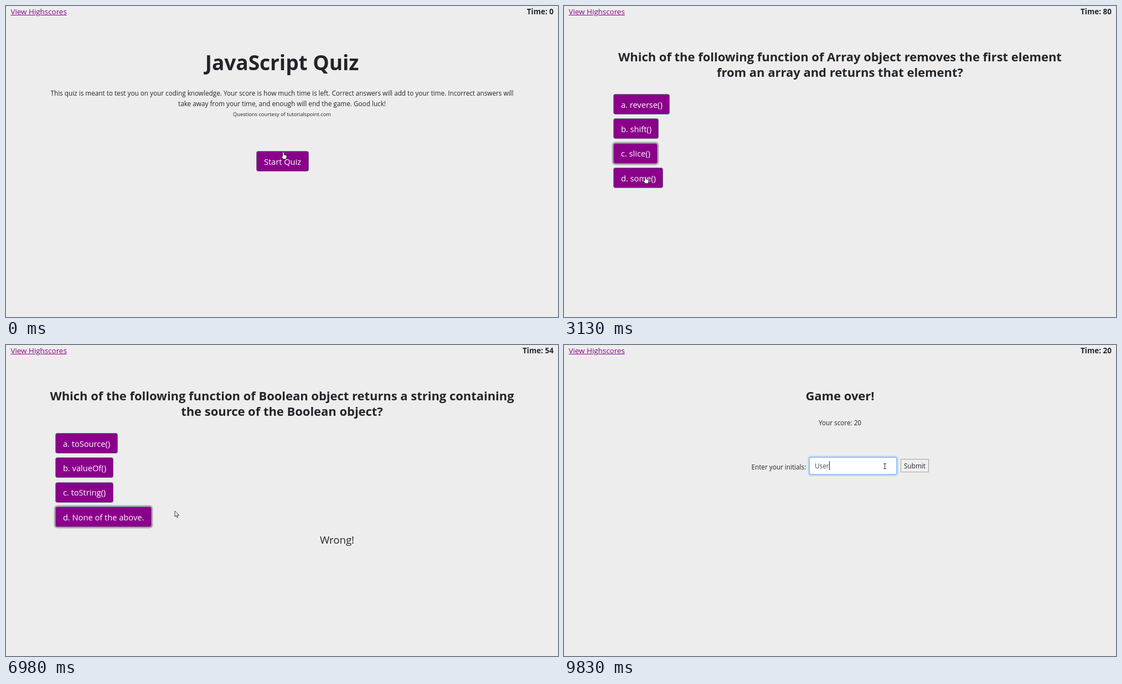
An HTML page for the animation above (9970 ms loop, 997 px wide and 562 px high).

```html
<!DOCTYPE html>
<html lang="en">
<head>
<meta charset="utf-8">
<title>JavaScript Quiz</title>
<style>
html, body { margin: 0; width: 997px; height: 562px; overflow: hidden; }
body { position: relative; background: #ededed; color: #212529; font: 11.74px "Open Sans", "Noto Sans", sans-serif; white-space: nowrap; }
body > *, .at { position: absolute; }
.row { position: absolute; left: 0; width: 997px; text-align: center; }
#link { left: 8.5px; top: 0; font-size: 13.4px; line-height: 20px; color: #8b008b; text-decoration: underline; }
#time { right: 8px; top: 0; font-size: 13.5px; line-height: 20px; font-weight: 700; }
h1, h2 { margin: 0; text-align: center; font-weight: 700; }
h1 { font-size: 37px; line-height: 48px; }
h2 { font-size: 21.95px; line-height: 28px; }
.btn { box-sizing: border-box; width: fit-content; padding: 6.5px 12.4px 5.4px 12.9px; border: 1px solid #6c757d; border-radius: 3.7px; background: #8b008b; color: #fff; font-size: 14.65px; line-height: 23.1px; text-align: center; }
.list { margin: 25.5px 0 0 89px; }
.list .btn { margin-bottom: 7.4px; }
.long { width: 534px; }
.ring { box-shadow: 0 0 0 2.4px rgba(108, 117, 125, .5); }
.msg { margin-left: 567px; font-size: 18.6px; line-height: 30px; }
.field { box-sizing: border-box; left: 443px; top: 203px; width: 158px; height: 31px; padding-left: 9px; border: 1px solid #ced4da; border-radius: 3px; background: #fff; color: #495057; line-height: 29px; }
.focus { border-color: #80bdff; box-shadow: 0 0 0 2.4px rgba(0, 123, 255, .25); }
.focus span { border-right: 1px solid #222; }
.submit { box-sizing: border-box; left: 608px; top: 206px; width: 51px; height: 24px; border: 1px solid #a0a0a0; background: #efefef; line-height: 23px; text-align: center; }
#cursor { left: 0; top: 0; overflow: visible; pointer-events: none; }
</style>
</head>
<body>
<div id="link">View Highscores</div>
<div id="time"></div>
<div id="page"></div>
<svg id="cursor" width="1" height="1"><path stroke="#222" stroke-width=".9" stroke-linejoin="round"/></svg>
<script>
const $ = id => document.getElementById(id);
const LOOP = 9970, OVER = 8870, TYPING = 9400, SECOND = 600;

const questions = {
  upper: ['Which built-in method returns the calling string value converted to upper<br>case?',
    'toUpperCase()', 'toUpper()', 'changeCase(case)', 'None of the above.'],
  array: ['Which of the following function of Array object removes the first element<br>from an array and returns that element?',
    'reverse()', 'shift()', 'slice()', 'some()'],
  string: ['Which of the following function of String object extracts a section of a string<br>and returns a new string?',
    'slice()', 'split()', 'replace()', 'search()'],
  bool: ['Which of the following function of Boolean object returns a string containing<br>the source of the Boolean object?',
    'toSource()', 'valueOf()', 'toString()', 'None of the above.'],
  cookie: ['Which of the following is true about cookie handling in JavaScript?',
    'JavaScript can manipulate cookies using the cookie property of the<br>Document object.',
    'JavaScript can read, create, modify, and delete the cookie or cookies<br>that apply to the current web page.',
    'Both of the above.', 'None of the above.']
};

// Each scene begins with a click on answer `pick`; `rest` is where the pointer goes next.
const scenes = [
  { at: 0, page: 'start', points: 0, rest: [0, 501, 264] },
  { at: 300, page: 'upper', points: 75, rest: [300, 500, 275] },
  { at: 820, page: 'upper', pick: 'a', points: 10, rest: [970, 156, 229] },
  { at: 2050, page: 'array', pick: 'b', points: -10 },
  { at: 2820, page: 'array', pick: 'c', points: 10, rest: [3130, 147, 308] },
  { at: 3730, page: 'string', pick: 'd', points: -10 },
  { at: 4360, page: 'string', pick: 'a', points: 10, rest: [4660, 148, 234] },
  { at: 5420, page: 'bool', pick: 'b', points: -10 },
  { at: 6660, page: 'bool', pick: 'd', points: -10, rest: [6980, 305, 300] },
  { at: 7750, page: 'cookie', pick: 'c', points: -10 },
  { at: 8400, page: 'cookie', pick: 'b', points: -10, rest: [8710, 245, 262.5] },
  { at: OVER, page: 'over', points: -10, rest: [OVER, 229, 276] }
];

const path = scenes.flatMap(({ at, pick, rest }) => [
  ...(pick ? [[at, 150, 178 + 44.4 * 'abcd'.indexOf(pick)]] : []),
  ...(rest ? [rest] : [])
]).concat([[TYPING, 579.5, 219], [LOOP, 579.5, 219]]);

const pointers = {
  hand: ['M-1.3 .8Q0-.9 1.3 .8V4.8L5 5.8Q6.3 6.3 6 8.5L5.2 12.7H-.3L-3.4 8.4Q-3.6 6.6-1.3 8Z', '#fff'],
  arrow: ['M0 0V10.2L2.4 8L4 11.8L5.7 11L4.1 7.4H7.2Z', '#fff'],
  beam: ['M-2.5-4.5H2.5M0-4.5V4.5M-2.5 4.5H2.5', 'none']
};

const row = (center, height, text, style = '') =>
  `<div class="row" style="top:${center - height / 2}px;line-height:${height}px;${style}">${text}</div>`;

function startPage() {
  return row(101.6, 48, '<h1>JavaScript Quiz</h1>') +
    row(157.5, 18.7, 'This quiz is meant to test you on your coding knowledge. Your score is how much time is left. Correct answers will add to your time. Incorrect answers will<br>take away from your time, and enough will end the game. Good luck!') +
    row(195.7, 14, 'Questions courtesy of tutorialspoint.com', 'font-size:9.3px') +
    '<div class="at btn" style="left:452px;top:262px">Start Quiz</div>';
}

function questionPage([title, ...answers], { pick, points }) {
  const buttons = answers.map((text, i) => {
    const key = 'abcd'[i];
    const look = (text.includes('<br>') ? ' long' : '') + (key === pick ? ' ring' : '');
    return `<div class="btn${look}">${key}. ${text}</div>`;
  }).join('');
  return `<div class="row" style="top:77.5px;text-align:left"><h2>${title}</h2>
    <div class="list">${buttons}</div>${points < 0 ? '<div class="msg">Wrong!</div>' : ''}</div>`;
}

function overPage(t) {
  const typed = 'User'.slice(0, Math.max(0, Math.floor((t - TYPING) / 100)));
  return row(91.5, 28, '<h2>Game over!</h2>') + row(139.5, 18, 'Your score: 20') +
    '<div class="at" style="left:338.5px;top:211.4px;line-height:18px">Enter your initials:</div>' +
    `<div class="at field${t >= TYPING ? ' focus' : ''}"><span>${typed}</span></div>` +
    '<div class="at submit">Submit</div>';
}

function timeLeft(past, t) {
  if (past.length === 1) return 0;
  const ticks = Math.floor((Math.min(t, OVER) + 180) / SECOND);
  return past.reduce((sum, s) => sum + s.points, 0) - ticks;
}

function pointerAt(t) {
  const i = path.findIndex(k => k[0] > t);
  const [t0, x0, y0] = path[i - 1], [t1, x1, y1] = path[i];
  const p = (t - t0) / (t1 - t0), ease = p * p * (3 - 2 * p);
  return [x0 + (x1 - x0) * ease, y0 + (y1 - y0) * ease];
}

function drawPointer(t) {
  const [x, y] = pointerAt(t);
  const under = document.elementFromPoint(x, y);
  const kind = under?.closest('.btn') ? 'hand' : under?.closest('.field') ? 'beam' : 'arrow';
  const shape = $('cursor').firstChild;
  shape.setAttribute('d', pointers[kind][0]);
  shape.setAttribute('fill', pointers[kind][1]);
  shape.setAttribute('transform', `translate(${x} ${y})`);
}

let shown;
function frame(now) {
  const t = now % LOOP;
  const past = scenes.filter(s => s.at <= t);
  const scene = past.at(-1);
  const html = scene.page === 'start' ? startPage()
    : scene.page === 'over' ? overPage(t)
    : questionPage(questions[scene.page], scene);
  if (html !== shown) $('page').innerHTML = shown = html;
  $('time').textContent = 'Time: ' + timeLeft(past, t);
  drawPointer(t);
  requestAnimationFrame(frame);
}
frame(0);
</script>
</body>
</html>
```
